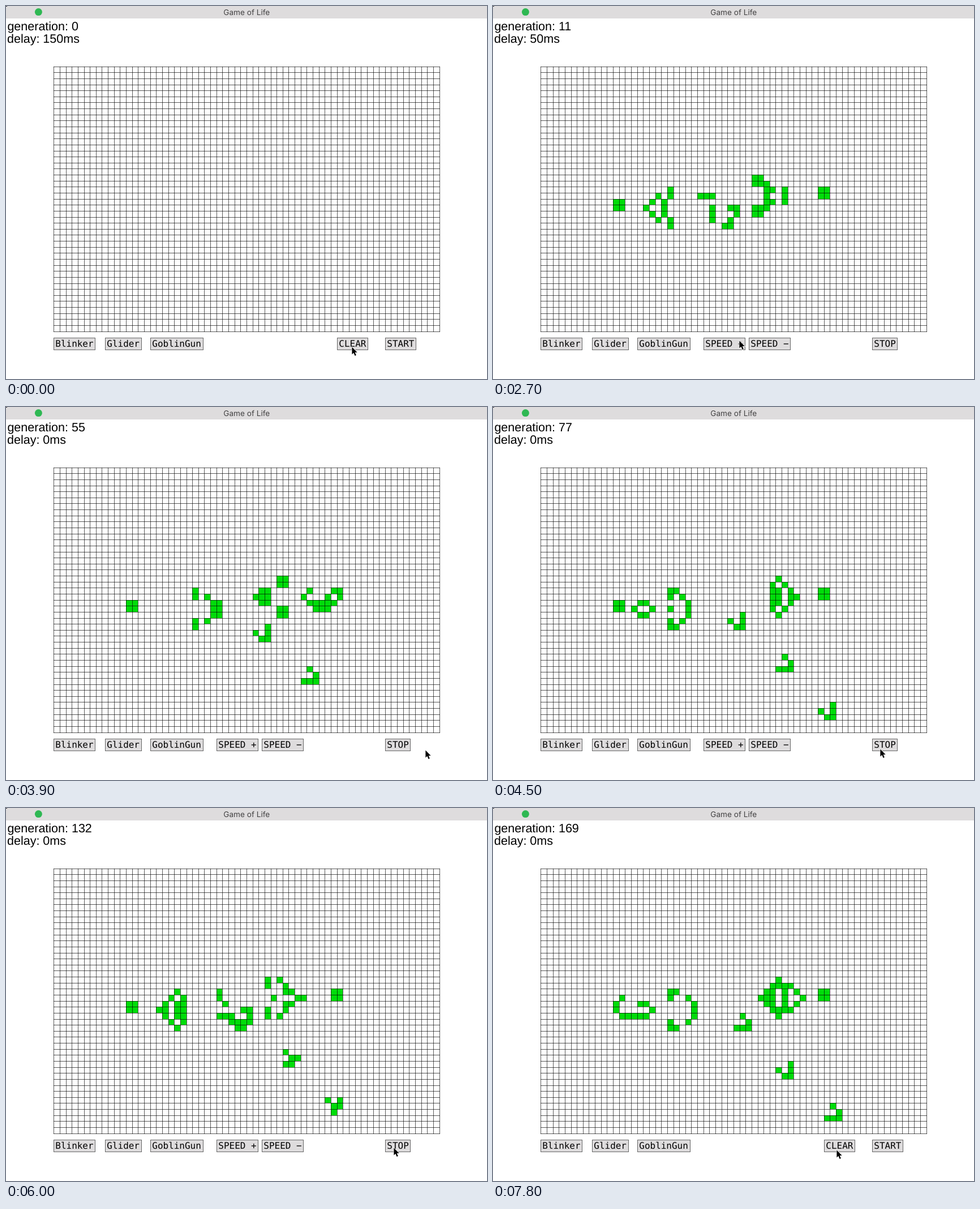
These frames come from a looping animation (850x659 px, 8 s). An HTML page:

```html
<!DOCTYPE html>
<html lang="en">
<head>
<meta charset="utf-8">
<title>Game of Life</title>
<style>
  html, body { margin: 0; width: 100%; height: 100%; overflow: hidden; background: #fff; }
  svg { display: block; width: 100%; height: 100%; }
  text { white-space: pre; text-rendering: geometricPrecision; }
  .title { font: 13.6px Inter, Roboto, sans-serif; fill: #434243; text-anchor: middle; }
  .info { font: 21.5px "Liberation Sans", Arial, sans-serif; fill: #000; }
  .button text { font: 15.975px "DejaVu Sans Mono", monospace; fill: #000; }
  .button rect { fill: #dedcdd; stroke: #666; }
</style>
</head>
<body>
<svg id="stage" viewBox="0 0 850 659">
  <rect width="850" height="659" fill="#fff"/>
  <rect width="850" height="22" fill="#dedcdd"/>
  <rect width="2" height="1" fill="#222"/>
  <circle cx="57.4" cy="10.6" r="6.5" fill="#2fb853"/>
  <text class="title" x="425.3" y="16">Game of Life</text>
  <text class="info" id="generation" x="2.4" y="43.4"></text>
  <text class="info" id="delay" x="2" y="64.7"></text>
  <path id="cells" fill="#00dc0a"/>
  <path id="grid" fill="none" stroke="#000" stroke-opacity=".65"/>
  <g id="buttons"></g>
  <path id="cursor" d="M.4 .6V13.6L3.4 10.8L5.6 16L7.8 15.1L5.7 10H9.7Z"
    fill="#000" stroke="#fff" stroke-width="1.4" paint-order="stroke"/>
</svg>
<script>
const COLS = 64, ROWS = 44, STEP = 300, LOOP = 8000, LAST_GEN = 169;
const PLACED = 3, STARTED = 5, STOPPED = 24;
const $ = id => document.getElementById(id);
const lineX = c => Math.floor(84.82 + 10.645 * c);
const lineY = r => Math.floor(107.1 + 10.637 * r);

function gridPath() {
  let d = "";
  for (let c = 0; c <= COLS; c++) d += `M${lineX(c) + .5} ${lineY(0)}V${lineY(ROWS) + 1}`;
  for (let r = 0; r <= ROWS; r++) d += `M${lineX(0)} ${lineY(r) + .5}H${lineX(COLS) + 1}`;
  return d;
}

// Glider gun, one string per row
const GUN = [
  "........................O",
  "......................O.O",
  "............OO......OO............OO",
  "...........O...O....OO............OO",
  "OO........O.....O...OO",
  "OO........O...O.OO....O.O",
  "..........O.....O.......O",
  "...........O...O",
  "............OO"
];
const WIDE = 256;

function seed() {
  const live = new Set();
  GUN.forEach((row, r) => [...row].forEach((ch, c) => {
    if (ch === "O") live.add((r + 18) * WIDE + c + 12);
  }));
  return live;
}

function evolve(live) {
  const counts = new Map();
  for (const cell of live)
    for (const dr of [-WIDE, 0, WIDE])
      for (const dc of [-1, 0, 1])
        if (dr || dc) counts.set(cell + dr + dc, (counts.get(cell + dr + dc) || 0) + 1);
  const next = new Set();
  for (const [cell, n] of counts) if (n === 3 || (n === 2 && live.has(cell))) next.add(cell);
  return next;
}

function cellPath(live) {
  let d = "";
  for (const cell of live) {
    const c = cell % WIDE, r = Math.floor(cell / WIDE);
    if (c < COLS && r < ROWS) d += `M${lineX(c)} ${lineY(r)}H${lineX(c + 1)}V${lineY(r + 1)}H${lineX(c)}Z`;
  }
  return d;
}

const paths = [];
for (let gen = 0, live = seed(); gen <= LAST_GEN; gen++, live = evolve(live)) paths.push(cellPath(live));

function addButton(label, x) {
  const width = Math.round(label.length * 9.617 + 6);
  $("buttons").insertAdjacentHTML("beforeend",
    `<g class="button"><rect x="${x - .5}" y="586.5" width="${width}" height="21"/>` +
    `<text x="${x + 2.3}" y="602.3">${label}</text></g>`);
  return $("buttons").lastElementChild;
}

addButton("Blinker", 85);
addButton("Glider", 176);
addButton("GoblinGun", 256);
const whenRunning = [addButton("SPEED +", 373), addButton("SPEED −", 453), addButton("STOP", 671)];
const whenStopped = [addButton("CLEAR", 586), addButton("START", 671)];
$("grid").setAttribute("d", gridPath());

// Pairs of step and value, joined by straight lines
const GENERATIONS = [[0, 0], [4, 0], [5, 1], [8, 7], [9, 11], [18, 110], [23, 166], [24, LAST_GEN]];
// Step, x, y of the pointer tip
const POINTER = [
  [0, 611, 602], [1, 540, 601], [2, 310, 600], [3, 303, 598], [4, 600, 597], [5, 690, 591],
  [6, 610, 594], [7, 440, 592], [8, 435, 591], [10, 435, 591], [12, 700, 602], [13, 741, 606],
  [14, 688, 614], [15, 684, 604], [16, 683, 600], [18, 683, 600], [23, 688, 600],
  [24, 688, 601], [25, 630, 605], [26, 607, 604]
];

function sample(keys, step, i = 1) {
  const next = keys.findIndex(key => key[0] >= step);
  if (next < 0) return keys[keys.length - 1][i];
  if (next === 0) return keys[0][i];
  const a = keys[next - 1], b = keys[next];
  return a[i] + (b[i] - a[i]) * (step - a[0]) / (b[0] - a[0]);
}

const show = (items, on) => items.forEach(el => el.setAttribute("visibility", on ? "visible" : "hidden"));

function render(time) {
  const step = Math.min(26, Math.floor(time / STEP));
  const gen = Math.round(sample(GENERATIONS, step));
  const delay = Math.max(0, Math.min(150, 150 - 50 * (step - 7)));
  const running = step >= STARTED && step < STOPPED;
  $("generation").textContent = "generation: " + gen;
  $("delay").textContent = `delay: ${delay}ms`;
  $("cells").setAttribute("d", step < PLACED ? "" : paths[gen]);
  show(whenRunning, running);
  show(whenStopped, !running);
  $("cursor").setAttribute("transform", `translate(${sample(POINTER, step)} ${sample(POINTER, step, 2)})`);
}

const start = performance.now();
function tick() {
  render((performance.now() - start) % LOOP);
  requestAnimationFrame(tick);
}
tick();
</script>
</body>
</html>
```
